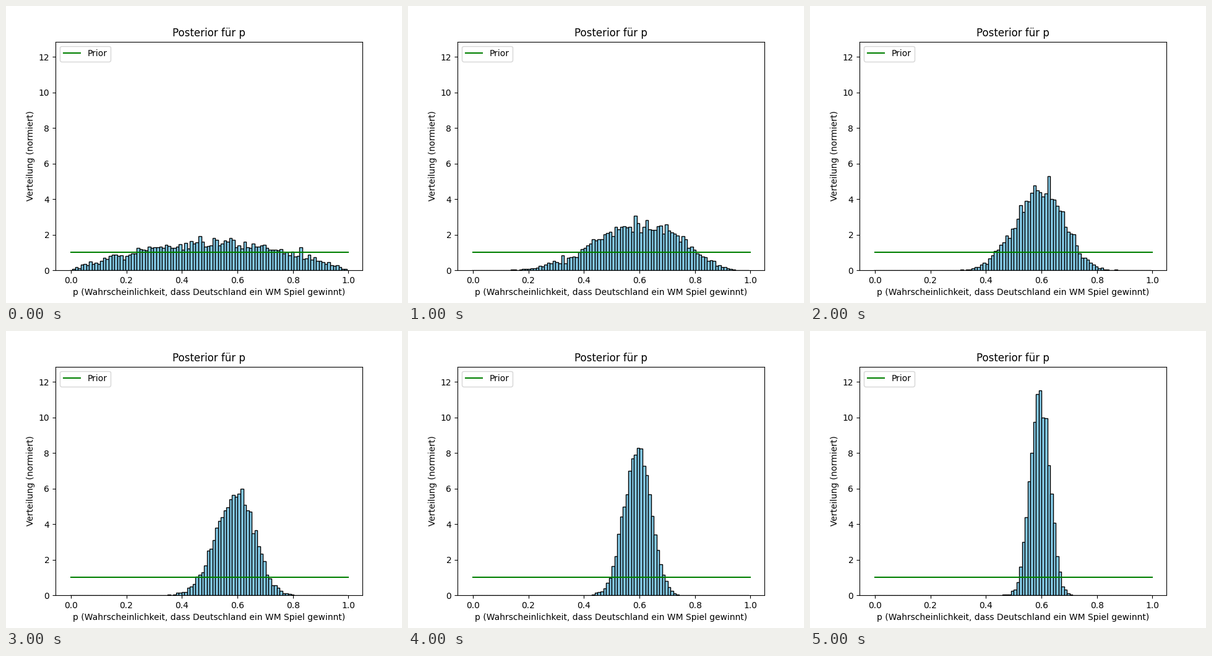
A matplotlib script that plays this animation: 640 px wide and 480 px high, repeating every 6 s.

```python
import matplotlib.pyplot as plt
import numpy as np
from matplotlib.animation import FuncAnimation

SAMPLES = 6000
STEP = 1 / 99
EDGES = (np.arange(100) - 0.5) * STEP

# Beta parameters of the posterior as more games are counted
POSTERIORS = [(2, 2), (6.3, 4.4), (18.5, 12.8), (29.4, 20.4), (61, 42), (123, 84)]


def density(a, b, seed):
    draws = np.random.default_rng(seed).beta(a, b, SAMPLES)
    return np.histogram(draws, EDGES, density=True)[0]


HEIGHTS = [density(a, b, seed) for seed, (a, b) in enumerate(POSTERIORS)]

fig, ax = plt.subplots(figsize=(6.4, 4.8), dpi=100)
bars = ax.bar(EDGES[:-1], HEIGHTS[0], width=STEP, align="edge",
              color="skyblue", edgecolor="black")
ax.plot([0, 1], [1, 1], color="green", label="Prior")

left = EDGES[0]
margin = 0.05 * (1 - left)
ax.set_xlim(left - margin, 1 + margin)
ax.set_ylim(0, 12.856)
ax.set_title("Posterior für p")
ax.set_xlabel("p (Wahrscheinlichkeit, dass Deutschland ein WM Spiel gewinnt)")
ax.set_ylabel("Verteilung (normiert)")
ax.legend(loc="upper left")


def update(i):
    for bar, h in zip(bars, HEIGHTS[i]):
        bar.set_height(h)
    return list(bars)


def init():
    return update(0)


anim = FuncAnimation(fig, update, frames=len(POSTERIORS), init_func=init,
                     interval=1000, repeat=True)
plt.show()
```
